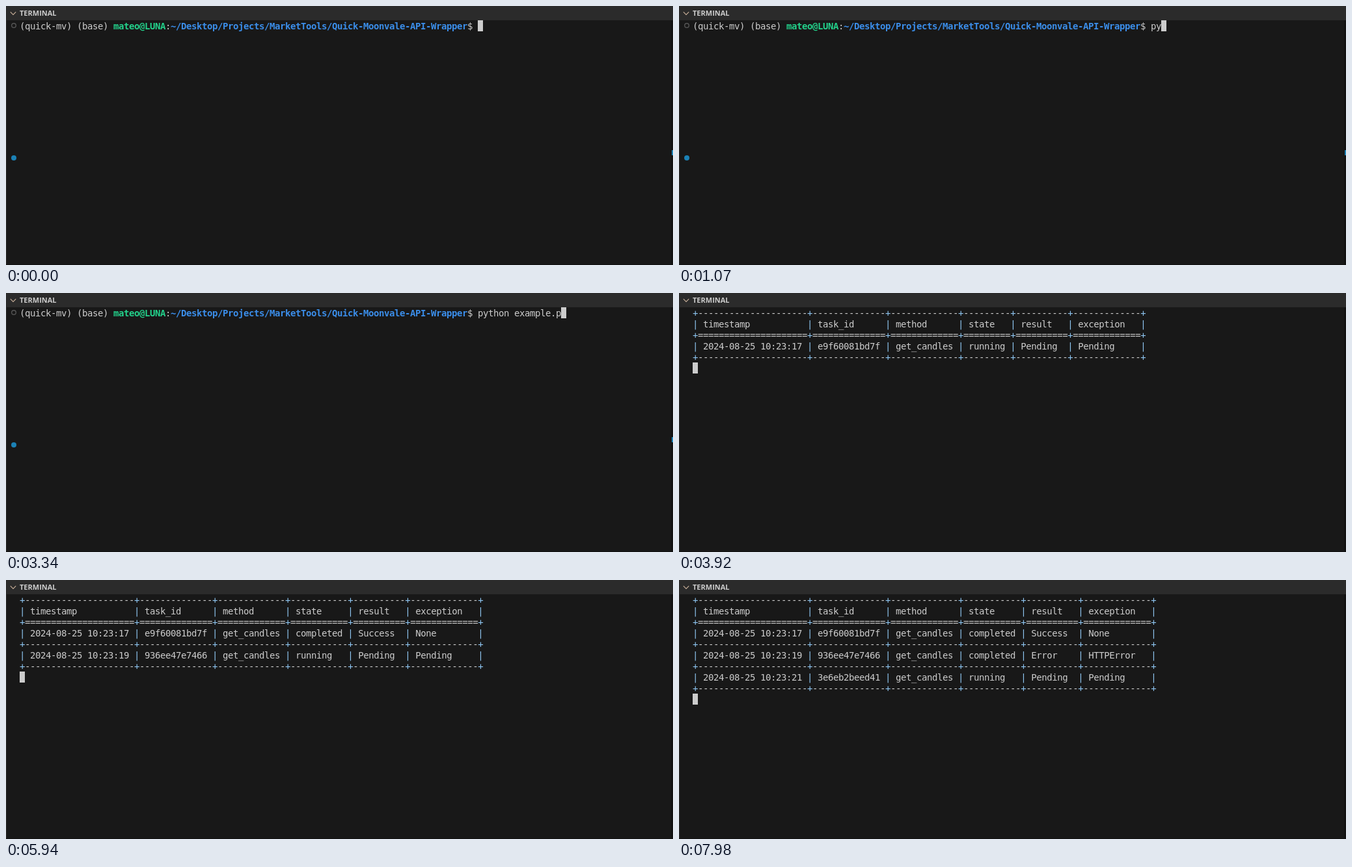
An HTML page for the animation above (8000 ms loop, 1025x399 px).

```html
<!DOCTYPE html>
<html lang="en">
<head>
<meta charset="utf-8">
<title>Terminal session</title>
<style>
  html, body { margin: 0; width: 100%; height: 100%; overflow: hidden; background: #181818; }
  svg { display: block; width: 1025px; height: 399px; }
  .title { font: bold 11px "Open Sans", sans-serif; fill: #ccc; }
  /* Snap every glyph to an 8px terminal cell. */
  #lines { font: 14px "DejaVu Sans Mono", monospace; letter-spacing: calc(8px - 0.60205em); fill: #ccc; }
  #lines text { white-space: pre; }
  .user { font-weight: bold; fill: #23d18b; }
  .path { font-weight: bold; fill: #3b8eea; }
  .rule { fill: #8fc7f3; }
</style>
</head>
<body>
<svg viewBox="0 0 1025 399" xmlns="http://www.w3.org/2000/svg">
  <rect width="1025" height="399" fill="#181818"/>
  <rect width="1025" height="22" fill="#2b2b2b"/>
  <rect y="22" width="1" height="377" fill="#2b2b2b"/>
  <rect x="1022" y="22" width="3" height="377" fill="#121212"/>
  <rect y="398" width="1025" height="1" fill="#121212"/>
  <path d="M6.8 9.2 L11 13.4 L15.2 9.2" fill="none" stroke="#c9b09a" stroke-width="1.1"/>
  <text class="title" x="21" y="15">TERMINAL</text>
  <g id="marks">
    <circle cx="12" cy="30" r="3.3" fill="none" stroke="#555" stroke-width="1.4"/>
    <circle cx="12" cy="234" r="4" fill="#1b81b5"/>
    <rect x="1023" y="222" width="2" height="8" fill="#1b81b5"/>
  </g>
  <g id="lines"></g>
  <rect id="cursor" width="8" height="17" fill="#ccc"/>
</svg>
<script>
const LOOP = 8000, CELL = 8, ROW = 17, LEFT = 21, TOP = 22, BASELINE = 14;
const COMMAND = "python example.py";
const KEY_TIMES = [610, 930, 1110, 1250, 1410, 1560, 1740, 1850, 2060, 2210,
                   2370, 2440, 2590, 2800, 3010, 3340, 3530];
const ENTER = 3740, TABLE = 3920;
const HEADERS = ["timestamp", "task_id", "method", "state", "result", "exception"];
const TASKS = [
  { start: TABLE, end: 4220, second: 17, id: "e9f60081bd7f", outcome: ["Success", "None"] },
  { start: 5940, end: 6090, second: 19, id: "936ee47e7466", outcome: ["Error", "HTTPError"] },
  { start: 7980, end: Infinity, second: 21, id: "3e6eb2beed41" },
];
const PROMPT_COLS = 88;

const $ = id => document.getElementById(id);
const span = (name, text) => `<tspan class="${name}">${text}</tspan>`;
const PROMPT = "(quick-mv) (base) " + span("user", "mateo@LUNA") + ":" +
  span("path", "~/Desktop/Projects/MarketTools/Quick-Moonvale-API-Wrapper") + "$ ";

function taskCells(task, t) {
  const result = t >= task.end ? ["completed", ...task.outcome] : ["running", "Pending", "Pending"];
  return [`2024-08-25 10:23:${task.second}`, task.id, "get_candles", ...result];
}

function tableLines(t) {
  const rows = TASKS.filter(task => t >= task.start).map(task => taskCells(task, t));
  const widths = HEADERS.map((head, i) =>
    Math.max(head.length + 2, ...rows.map(row => row[i].length)) + 2);
  const rule = mark => "+" + widths.map(w => mark.repeat(w) + "+").join("");
  const line = cells => "|" + cells.map((cell, i) => (" " + cell).padEnd(widths[i]) + "|").join("");
  return [rule("-"), line(HEADERS), rule("="), ...rows.flatMap(row => [line(row), rule("-")])]
    .map(text => text.replace(/[+|]/g, mark => span("rule", mark)));
}

function screen(t) {
  if (t >= TABLE) {
    const lines = tableLines(t);
    return { lines, col: 0, row: lines.length };
  }
  const typed = KEY_TIMES.filter(time => t >= time).length;
  const lines = [PROMPT + COMMAND.slice(0, typed)];
  return t >= ENTER ? { lines, col: 0, row: 1 } : { lines, col: PROMPT_COLS + typed, row: 0 };
}

let shown = "";
function render(t) {
  const { lines, col, row } = screen(t);
  const markup = lines.map((text, i) =>
    `<text x="${LEFT}" y="${TOP + i * ROW + BASELINE}">${text}</text>`).join("");
  if (markup !== shown) $("lines").innerHTML = shown = markup;
  $("cursor").setAttribute("x", LEFT + col * CELL);
  $("cursor").setAttribute("y", TOP + row * ROW);
  $("marks").setAttribute("visibility", t < TABLE ? "visible" : "hidden");
}

const begin = performance.now();
function tick() {
  render((performance.now() - begin) % LOOP);
  requestAnimationFrame(tick);
}
tick();
</script>
</body>
</html>
```
